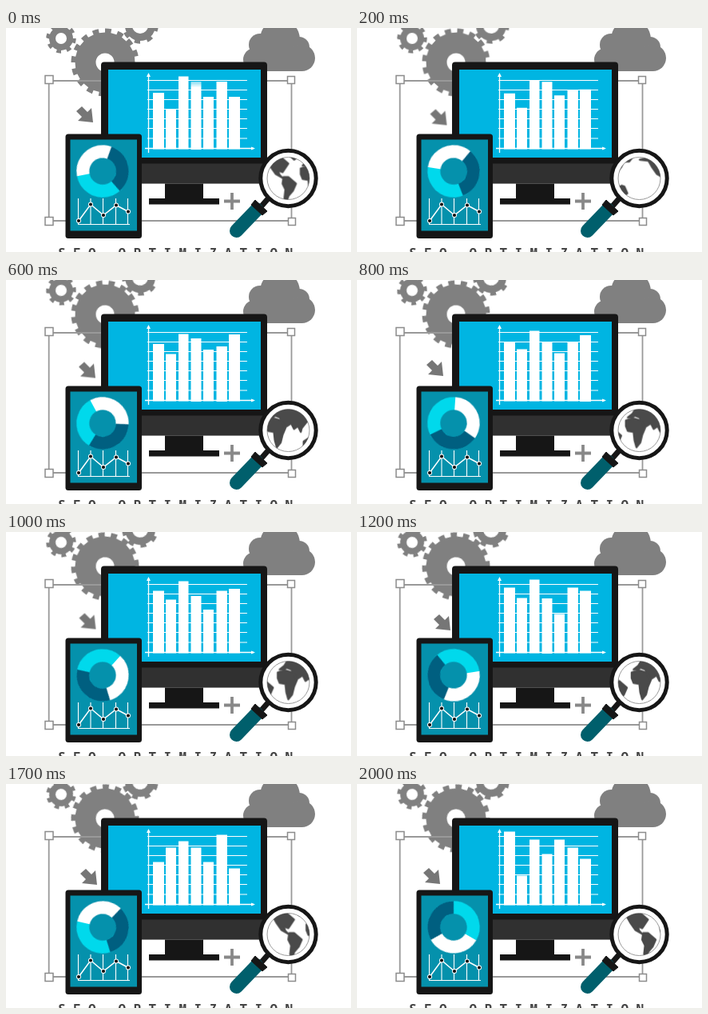
These frames come from a looping animation (432x280 px, 2.1 s). An HTML page without scripts:

```html
<!DOCTYPE html>
<html lang="en">
<head>
<meta charset="utf-8">
<title>Search optimization</title>
<style>
html, body { margin: 0; width: 100%; height: 100%; overflow: hidden; background: #fff; }
svg { display: block; width: 432px; height: 280px; }
.move { animation: 2100ms infinite; }

/* each bar lists its heights at the seven key poses */
.bar { animation-name: grow; }
@keyframes grow {
  0% { transform: scaleY(var(--a)); animation-timing-function: steps(4); }
  19.04% { transform: scaleY(var(--b)); animation-timing-function: steps(4); }
  38.09% { transform: scaleY(var(--c)); animation-timing-function: steps(4); }
  57.14% { transform: scaleY(var(--d)); animation-timing-function: steps(3); }
  71.42% { transform: scaleY(var(--e)); animation-timing-function: steps(2); }
  80.95% { transform: scaleY(var(--f)); animation-timing-function: steps(3); }
  95.23%, 100% { transform: scaleY(var(--g)); }
}
.donut { animation-name: turn; }
@keyframes turn {
  0% { transform: rotate(-101deg); animation-timing-function: steps(4); }
  19.04% { transform: rotate(-61deg); animation-timing-function: steps(4); }
  38.09% { transform: rotate(4deg); animation-timing-function: steps(4); }
  57.14% { transform: rotate(81deg); animation-timing-function: steps(3); }
  71.42% { transform: rotate(213deg); animation-timing-function: steps(2); }
  80.95% { transform: rotate(283deg); animation-timing-function: steps(3); }
  95.23%, 100% { transform: rotate(480deg); }
}
.land { animation-name: spin; }
@keyframes spin {
  0% { transform: translateX(18px); animation-timing-function: steps(4); }
  19.04% { transform: translateX(81px); animation-timing-function: steps(4); }
  38.09% { transform: translateX(99px); animation-timing-function: steps(4); }
  57.14% { transform: translateX(105px); animation-timing-function: steps(3); }
  71.42% { transform: translateX(129px); animation-timing-function: steps(2); }
  80.95% { transform: translateX(132px); animation-timing-function: steps(3); }
  95.23%, 100% { transform: translateX(135px); }
}
.arrow { animation-name: nudge; }
@keyframes nudge {
  0% { transform: translate(88px, 97px); animation-timing-function: steps(4); }
  19.04% { transform: translate(95px, 104px); animation-timing-function: steps(4); }
  38.09% { transform: translate(87px, 99px); animation-timing-function: steps(4); }
  57.14% { transform: translate(96px, 102px); animation-timing-function: steps(3); }
  71.42% { transform: translate(91px, 106px); animation-timing-function: steps(2); }
  80.95% { transform: translate(93px, 105px); animation-timing-function: steps(3); }
  95.23%, 100% { transform: translate(83px, 104px); }
}
.gear { animation-name: gear; animation-timing-function: steps(21); }
@keyframes gear { to { transform: rotate(var(--by)); } }
text { font: bold 16px "Noto Sans Mono", "DejaVu Sans Mono", monospace; letter-spacing: 9.4px; }
</style>
</head>
<body>
<svg viewBox="0 0 432 280">
  <defs>
    <clipPath id="ball"><circle r="26.5"/></clipPath>
    <g id="map">
      <path d="M-49-22L-40-24-25-24-18-18-22-12-24-9-29-11-27-6-24-3-31-7-36-14-40-21Z"/>
      <path d="M-23-4L-18-4-10 3-13 10-18 16-20 23-22 18-21 9-24 3Z"/>
      <path d="M-16-26H-7L-12-22Z"/>
      <path d="M-5-13L3-15 10-13 15-5 12 2 10 10 6 15 4 8 3-1-3-2-5-7Z"/>
      <path d="M-3-16L2-20 5-25 18-25 35-26 51-24 48-20 42-20 40-15 36-10 32-5 31-1 28-7 24-4 21-10 15-6 11-13 9-16 4-18 2-16Z"/>
      <path d="M34 9L40 5 43 6 46 13 42 16 38 14 34 15Z"/>
    </g>
  </defs>

  <!-- gears -->
  <g fill="none" stroke="#808080">
    <g transform="translate(124 43)"><g class="move gear" style="--by:22.5deg">
      <circle r="24.500" stroke-width="26"/>
      <circle r="39.500" stroke-width="6" pathLength="32" stroke-dasharray="1 1"/>
    </g></g>
    <g transform="translate(69 13)"><g class="move gear" style="--by:-45deg">
      <circle r="11" stroke-width="8"/>
      <circle r="16.500" stroke-width="4.500" pathLength="16" stroke-dasharray=".9 1.1"/>
    </g></g>
    <g transform="translate(168 -3)"><g class="move gear" style="--by:-45deg">
      <circle r="14.500" stroke-width="9"/>
      <circle r="20.500" stroke-width="4.500" pathLength="16" stroke-dasharray=".9 1.1"/>
    </g></g>
  </g>

  <!-- cloud -->
  <g fill="#808080">
    <circle cx="311.500" cy="39.500" r="14.500"/><circle cx="318" cy="21" r="14"/>
    <circle cx="343" cy="14" r="25"/><circle cx="367" cy="24" r="13"/>
    <circle cx="370.500" cy="37.500" r="16.500"/>
    <path d="M312 24H370V54H312Z"/>
  </g>

  <!-- selection frame -->
  <g fill="none" stroke="#8c8c8c" stroke-width="1.500">
    <path d="M53.700 66H357.500V241H53.700Z" stroke="#999" stroke-width="1.800"/>
    <path d="M49 59.500h10v10h-10zM352.500 60.500h9v9h-9zM49 236.500h10v10h-10zM353.500 237.500h9v9h-9z" fill="#fff"/>
  </g>

  <!-- monitor -->
  <rect x="119" y="42.500" width="208" height="152" rx="4" fill="#161616"/>
  <path d="M128 52H319V162H128Z" fill="#00b5e2"/>
  <path d="M123 169.500H327V194H123Z" fill="#303030"/>
  <path d="M199 194.500H247V213H267V220.500H179V213H199Z" fill="#161616"/>
  <g stroke="#fff" fill="none">
    <path d="M177 65.500H302M177 77.500H302M177 89.500H302M177 101.500H302M177 113.500H302M177 125.500H302M177 138H302" stroke-width="1.200"/>
    <path d="M178.500 156V58M174 150.500H310" stroke-width="1.300"/>
  </g>
  <path d="M178.500 56l2.500 5h-5zM312 150.500l-5-2v4z" fill="#fff"/>
  <g fill="#fff" transform="translate(0 151.500) scale(1 -1)">
    <rect class="move bar" x="184" width="14" height="1" style="--a:70.5;--b:69;--c:74;--d:82;--e:75;--f:54;--g:92"/>
    <rect class="move bar" x="200" width="13" height="1" style="--a:50.5;--b:53;--c:65;--d:69;--e:53;--f:72;--g:37"/>
    <rect class="move bar" x="216" width="12.500" height="1" style="--a:91;--b:80;--c:88;--d:92;--e:79;--f:80;--g:82"/>
    <rect class="move bar" x="231.500" width="13" height="1" style="--a:84.5;--b:84;--c:74;--d:69;--e:79;--f:72;--g:64"/>
    <rect class="move bar" x="247" width="13" height="1" style="--a:65.5;--b:69;--c:60;--d:49;--e:42;--f:54;--g:82"/>
    <rect class="move bar" x="263.500" width="13.500" height="1" style="--a:84.5;--b:64;--c:74;--d:82;--e:75;--f:88;--g:72"/>
    <rect class="move bar" x="279" width="14" height="1" style="--a:65.5;--b:84;--c:83;--d:78;--e:58;--f:46;--g:58"/>
  </g>

  <!-- arrow and plus -->
  <path class="move arrow" d="M7 1L14 8 19 3 21 21 2 19 7 14 0 7Z" fill="#767676"/>
  <path d="M273 216.500H293M283 206V227" stroke="#888" stroke-width="3.800"/>

  <!-- tablet -->
  <rect x="74.500" y="132.500" width="95.500" height="130.500" rx="3.500" fill="#161616"/>
  <path d="M80.500 139.500H164V253.500H80.500Z" fill="#0591ac"/>
  <g transform="translate(121 179)"><g class="move donut">
    <g transform="rotate(-90)" fill="none" stroke-width="16">
      <circle r="24.700" stroke="#00d9ec"/>
      <circle r="24.700" stroke="#005f80" pathLength="360" stroke-dasharray="240 120"/>
      <circle r="24.700" stroke="#fff" pathLength="360" stroke-dasharray="121 239"/>
    </g>
  </g></g>
  <g stroke="#fff" fill="none">
    <path d="M90.500 213V246M106 213V246M121.500 213V246M137.500 213V246M152.500 213V246M90 245.500H155" stroke-width="1.100"/>
    <path d="M91 241L106 220.500 122 234 138 221.500 153 229.500" stroke-width="1.500"/>
    <path d="M91 241h0M106 220.500h0M122 234h0M138 221.500h0M153 229.500h0" stroke-width="6" stroke-linecap="round"/>
    <path d="M91 241h0M106 220.500h0M122 234h0M138 221.500h0M153 229.500h0" stroke="#111" stroke-width="4.200" stroke-linecap="round"/>
  </g>

  <!-- magnifier -->
  <path d="M331 210L317 226" stroke="#161616" stroke-width="7"/>
  <path d="M314 227L288.500 253.500" stroke="#005f6c" stroke-width="17" stroke-linecap="round"/>
  <path d="M312 215L327 229 321 234 307 221Z" fill="#161616" stroke="#161616" stroke-linejoin="round"/>
  <circle cx="353.500" cy="188" r="34.700" fill="#fff" stroke="#161616" stroke-width="5"/>
  <g transform="translate(353.500 188)">
    <circle r="26.500" fill="#fff" stroke="#999"/>
    <g clip-path="url(#ball)"><g transform="translate(0 3) scale(1.2)">
      <g class="move land" fill="#4a4a4a" stroke="#4a4a4a" stroke-width="2" stroke-linejoin="round">
        <use href="#map" x="-108"/><use href="#map"/>
      </g>
    </g></g>
  </g>

  <text y="287" fill="#444"><tspan x="65">SEO</tspan><tspan x="140.500">OPTIMIZATION</tspan></text>
</svg>
</body>
</html>
```
